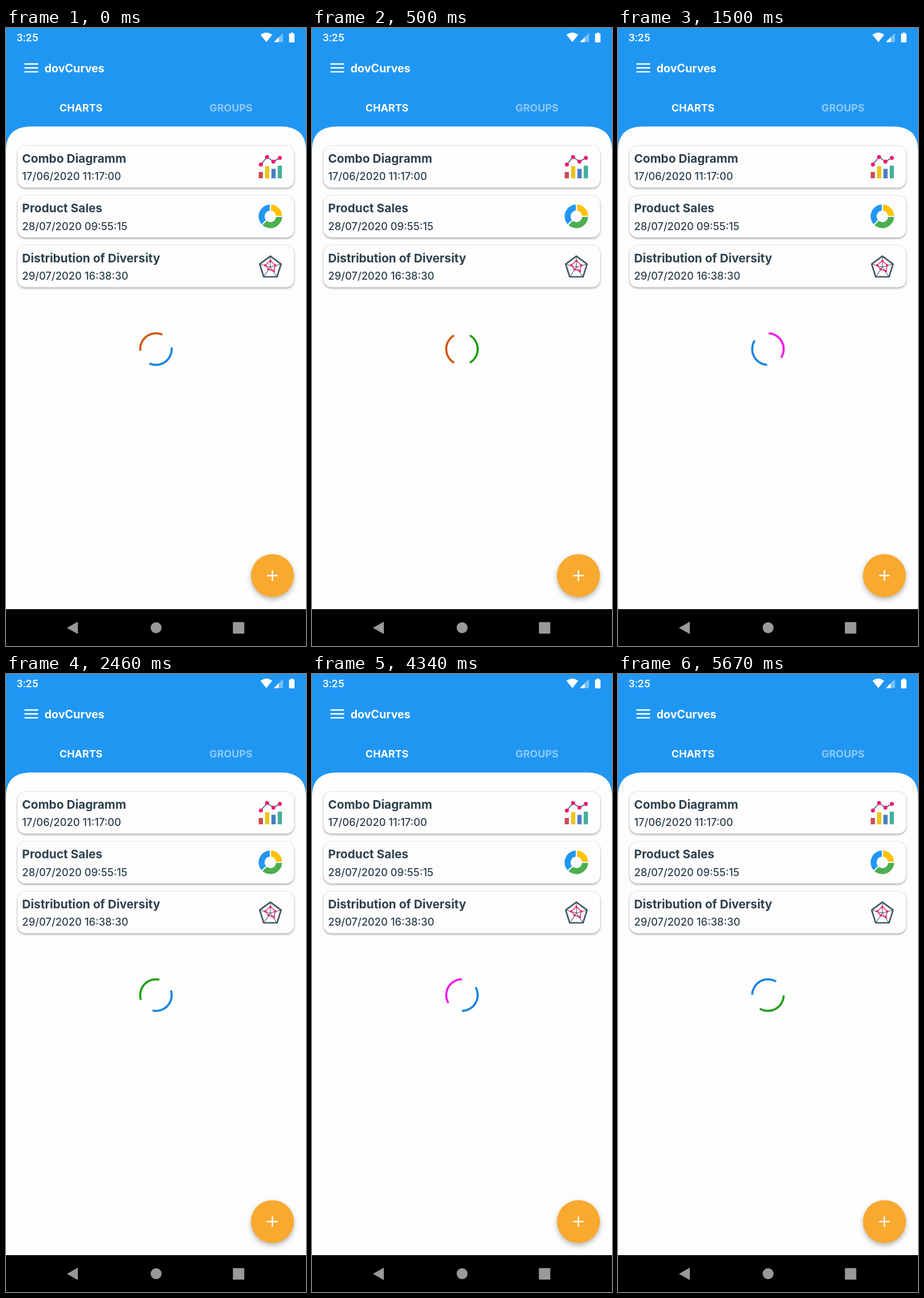
Animation of 522 by 1073 pixels, one loop 5710 ms. Source, as an HTML page:

```html
<!DOCTYPE html>
<html lang="en">
<head>
<meta charset="utf-8">
<title>Charts</title>
<style>
  html, body { margin: 0; width: 100%; height: 100%; overflow: hidden; background: #2096f3; }
  svg { display: block; width: 522px; height: 1073px; font-family: Inter, "Open Sans", sans-serif; }
  .clock { font: 500 19px Roboto, sans-serif; }
  .brand { font-size: 19.5px; font-weight: 700; }
  .tab { font-size: 17.8px; font-weight: 700; text-anchor: middle; }
  .name { font-size: 20.7px; font-weight: 700; }
  .date { font-size: 18.2px; font-weight: 450; }
  .cards text { fill: #2e414c; }
  .cards rect.card { fill: #fdfdfd; stroke: #e3e3ea; stroke-width: 1; filter: drop-shadow(0 2px 1.5px rgba(50, 50, 70, .36)); }
  .fab { filter: drop-shadow(0 4px 4px rgba(0, 0, 0, .28)); }

  .spin { --orange: #d05205; --blue: #0f7fe0; --green: #169b10; --pink: #f012e8;
    fill: none; stroke-width: 3.6; animation: turn 5710ms infinite; }
  .arc-a { animation: tint-a 5710ms step-end infinite; }
  .arc-b { animation: tint-b 5710ms step-end infinite; }

  /* the spinner advances at 24 poses per second */
  @keyframes turn {
    0%     { transform: rotate(54deg);     animation-timing-function: steps(12); }
    8.72%  { transform: rotate(360deg);    animation-timing-function: steps(24); }
    26.23% { transform: rotate(1053deg);   animation-timing-function: steps(23); }
    43.05% { transform: rotate(1662.5deg); animation-timing-function: steps(20); }
    57.58% { transform: rotate(2245deg);   animation-timing-function: steps(25); }
    75.97% { transform: rotate(2910deg);   animation-timing-function: steps(32); }
    99.26% { transform: rotate(3841deg);   animation-timing-function: step-end; }
    100%   { transform: rotate(3869deg); }
  }
  @keyframes tint-a {
    0%    { stroke: var(--blue); }
    4.4%  { stroke: var(--green); }
    17.5% { stroke: var(--pink); }
    34.7% { stroke: var(--green); }
    50.3% { stroke: var(--orange); }
    66.8%, 100% { stroke: var(--blue); }
  }
  @keyframes tint-b {
    0%    { stroke: var(--orange); }
    17.5% { stroke: var(--blue); }
    66.8% { stroke: var(--pink); }
    87.6%, 100% { stroke: var(--green); }
  }
</style>
</head>
<body>
<svg viewBox="0 0 522 1073" xmlns="http://www.w3.org/2000/svg">
  <rect width="522" height="1073" fill="#2096f3"/>

  <!-- status bar -->
  <g fill="#fff">
    <text class="clock" x="18.5" y="23">3:25</text>
    <path d="M453 24.5 442.8 11.8Q453 4.200 463.200 11.800Z"/>
    <path d="M482 8.500V24.500H466Z" opacity=".4"/>
    <path d="M474.500 16V24.500H466Z"/>
    <path d="M495.500 8H499.500V9.500H501Q502 9.500 502 10.500V24Q502 25 501 25H493.500Q492.500 25 492.500 24V10.500Q492.500 9.500 493.500 9.500H495.500Z"/>
  </g>

  <!-- app bar -->
  <path d="M32 62.500H56M32 69.300H56M32 76.100H56" stroke="#fff" stroke-width="2.400"/>
  <g fill="#fff">
    <text class="brand" x="67" y="76.500">dovCurves</text>
    <text class="tab" x="130.500" y="145">CHARTS</text>
    <text class="tab" x="391.500" y="145" opacity=".5">GROUPS</text>
  </g>

  <path d="M0 1009V213Q0 171 44 171H478Q522 171 522 213V1009Z" fill="#fdfdfd"/>

  <!-- list -->
  <g class="cards">
    <rect class="card" x="20" y="204" width="481.500" height="73" rx="14"/>
    <rect class="card" x="20" y="290.500" width="481.500" height="73" rx="14"/>
    <rect class="card" x="20" y="377" width="481.500" height="73" rx="14"/>
    <text class="name" x="28" y="233.500">Combo Diagramm</text>
    <text class="date" x="28" y="264">17/06/2020 11:17:00</text>
    <text class="name" x="28" y="320">Product Sales</text>
    <text class="date" x="28" y="350.500">28/07/2020 09:55:15</text>
    <text class="name" x="28" y="406.500">Distribution of Diversity</text>
    <text class="date" x="28" y="437">29/07/2020 16:38:30</text>
  </g>

  <!-- combo icon -->
  <path d="M443.500 237 454.200 224 465.300 232 476.500 225.500" fill="none" stroke="#455a64" stroke-width="1.500"/>
  <g fill="#e91e72">
    <circle cx="443.500" cy="237" r="3.500"/><circle cx="454.200" cy="224" r="3.500"/>
    <circle cx="465.300" cy="232" r="3.500"/><circle cx="476.500" cy="225.500" r="3.500"/>
  </g>
  <rect x="439.700" y="250" width="7.300" height="11" fill="#cb4c55"/>
  <rect x="450.800" y="240" width="7.300" height="21" fill="#edc417"/>
  <rect x="461.800" y="244.500" width="7.300" height="16.500" fill="#487ec4"/>
  <rect x="472.800" y="239" width="7.300" height="22" fill="#43b09c"/>

  <!-- donut icon -->
  <g transform="translate(460 327)" fill="none" stroke-width="10.500">
    <path d="M0-15.200A15.200 15.200 0 0 1 15.200 0" stroke="#ffc107"/>
    <path d="M15.200 0A15.200 15.200 0 0 1-10.750 10.750" stroke="#4caf50"/>
    <path d="M-10.750 10.750A15.200 15.200 0 0 1 0-15.200" stroke="#2196f3"/>
    <path d="M0-22V0H22M0 0-16 16" stroke="#fdfdfd" stroke-width="2.200"/>
  </g>

  <!-- radar icon -->
  <g transform="translate(460 415)" fill="none" stroke="#455a64" stroke-linejoin="round">
    <path d="M0-18.800 18.600-5.200 11.600 17H-11.600L-18.600-5.200Z" stroke-width="2.700"/>
    <path d="M0 0V-18M0 0 18-5M0 0 11 16.500M0 0-11 16.500M0 0-18-5" stroke-width="1.100"/>
    <path d="M0-11 8.500-3 6 7-3 4-9-3Z" stroke="#e91e72" stroke-width="1.400"/>
    <g fill="#e91e72" stroke="none">
      <circle cy="-10.500" r="2"/><circle cx="8.500" cy="-3" r="2"/><circle cx="6" cy="7" r="2"/>
      <circle cx="-3" cy="4" r="2"/><circle cx="-9" cy="-3" r="2"/>
    </g>
  </g>

  <!-- spinner -->
  <g transform="translate(260.900 557.500)">
    <g class="spin">
      <path class="arc-a" d="M13.700-23.730A27.400 27.400 0 0 1 13.700 23.730"/>
      <path class="arc-b" d="M-13.700 23.730A27.400 27.400 0 0 1-13.700-23.730"/>
    </g>
  </g>

  <circle class="fab" cx="463.600" cy="950.800" r="37.400" fill="#f8a930"/>
  <path d="M454.300 950.800H472.700M463.500 941.600V960" stroke="#fff" stroke-width="2.400"/>

  <!-- navigation bar -->
  <rect y="1009" width="522" height="64"/>
  <g fill="#999">
    <path d="M106 1041.500 125 1030.800V1052.200Z"/>
    <circle cx="261.200" cy="1041.300" r="9.500"/>
    <rect x="394.800" y="1031.500" width="19.800" height="20" rx="1"/>
  </g>
</svg>
</body>
</html>
```
